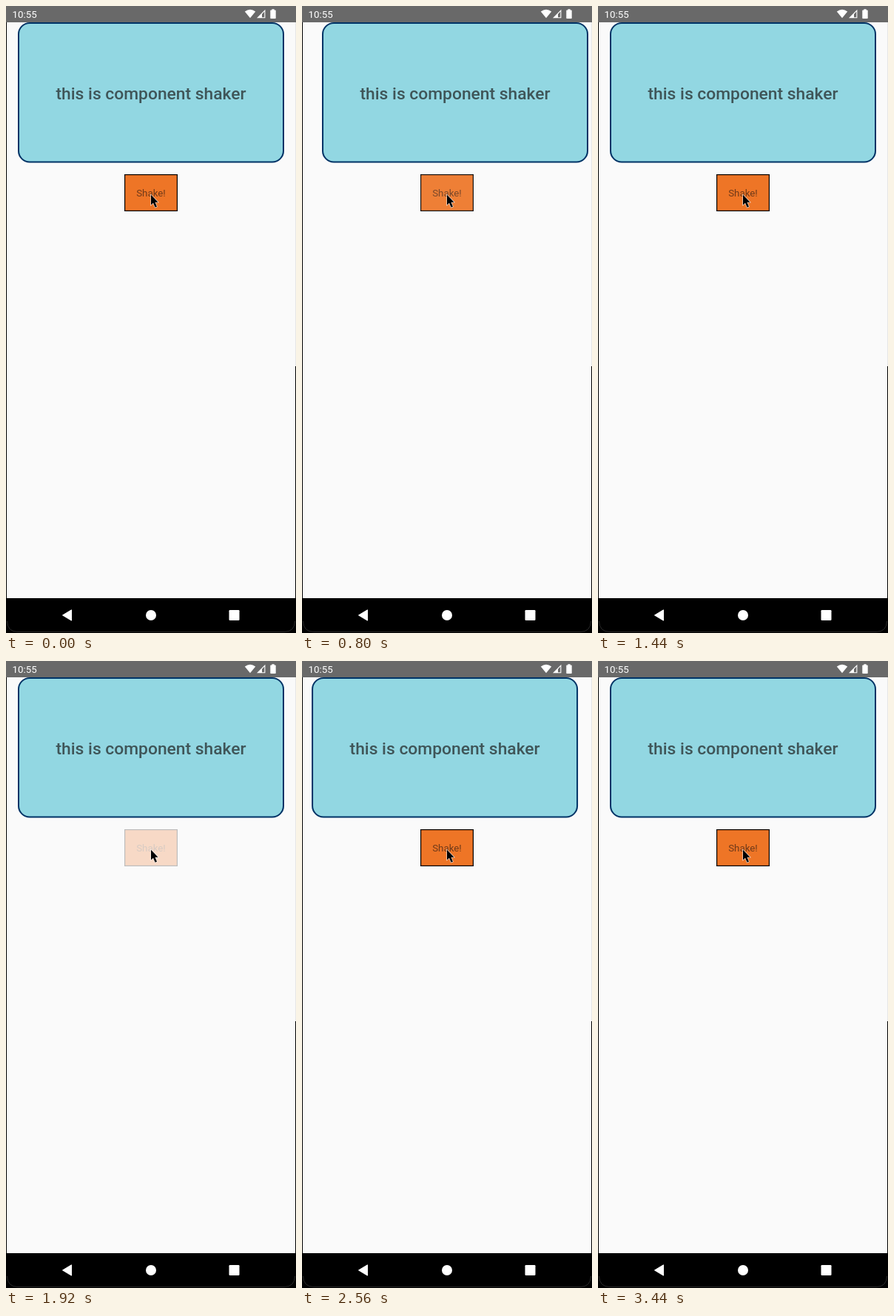
An HTML page that plays this animation: 392x846 px, repeating every 3.52 s.

```html
<!DOCTYPE html>
<html lang="en">
<head>
<meta charset="utf-8">
<title>Component shaker</title>
<style>
  html, body { margin: 0; width: 100%; height: 100%; overflow: hidden; background: #000; }
  svg { display: block; width: 392px; height: 846px; font-family: Roboto, sans-serif; }
</style>
</head>
<body>
<svg viewBox="0 0 392 846">
  <!-- screen -->
  <rect width="392" height="846"/>
  <rect x="1" y="22" width="390" height="777" fill="#fafafa"/>
  <rect x="391" y="22" width="1" height="464" fill="#e6e6e6"/>

  <g id="card">
    <rect x="17" y="23" width="358" height="187.5" rx="15" fill="#92d7e2" stroke="#003366" stroke-width="2"/>
    <text x="196" y="126" text-anchor="middle" font-size="22.8" font-weight="500" fill="#3f5558">this is component shaker</text>
  </g>

  <g id="button">
    <rect x="160.6" y="227.6" width="70.8" height="48.8" fill="#ee7526" stroke="#000" stroke-width="1.2"/>
    <text x="196" y="257" text-anchor="middle" font-size="13.3" fill="#6f3a1a">Shake!</text>
  </g>

  <!-- status bar -->
  <rect width="392" height="22" fill="#696969"/>
  <g fill="#fff">
    <text x="8.5" y="15.5" font-size="13.3">10:55</text>
    <path d="M322.8 7.4Q330 2.2 337.2 7.4L330 16.3Z"/>
    <path d="M339 16.3L350.4 4.8V16.3ZM346 15.2H349.3V7.6L346 10.9Z" fill-rule="evenodd"/>
    <path d="M357.3 6.2Q357.3 5.5 358 5.5H359.4V4.2H362.6V5.5H364Q364.7 5.5 364.7 6.2V16.3Q364.7 17 364 17H358Q357.3 17 357.3 16.3Z"/>
  </g>

  <!-- navigation bar -->
  <rect y="799" width="392" height="47"/>
  <path d="M1.5 830Q2 844.5 16 844.5H376Q390 844.5 390.5 830" fill="none" stroke="#292929"/>
  <g fill="#fff">
    <path d="M76.5 822L88.5 814.8V829.2Z" stroke="#fff" stroke-linejoin="round"/>
    <circle cx="196" cy="822" r="7"/>
    <rect x="301.5" y="815" width="14" height="14" rx="1.2"/>
  </g>

  <!-- pointer -->
  <path d="M196 254.8V268.4L199 265.7L201.6 271.7L204 270.7L201.5 264.8H205.6Z" stroke="#fff" stroke-width="1.1" paint-order="stroke"/>
</svg>
<script>
  const LOOP = 3520, STEP = 80, AMPLITUDE = 15, SWINGS = 2.5;
  const taps = [
    { press: 640, start: 696, period: 282 },
    { press: 1920, start: 2070, period: 320 }
  ];
  const card = document.getElementById('card');
  const button = document.getElementById('button');
  const clamp = v => Math.min(1, Math.max(0, v));
  const smooth = p => p * p * (3 - 2 * p);

  function shakeOffset(t, { start, period }) {
    const cycles = (t - start) / period;
    return cycles > 0 && cycles < SWINGS ? AMPLITUDE * Math.sin(2 * Math.PI * cycles) : 0;
  }

  function buttonOpacity(t, { press }) {
    return t < press ? 1 : 0.24 + 0.76 * smooth(clamp((t - press) / 200));
  }

  function render(t) {
    const x = taps.reduce((sum, tap) => sum + shakeOffset(t, tap), 0);
    card.setAttribute('transform', `translate(${x.toFixed(2)} 0)`);
    button.setAttribute('opacity', Math.min(...taps.map(tap => buttonOpacity(t, tap))));
  }

  const origin = performance.now();
  function tick() {
    const t = (performance.now() - origin) % LOOP;
    render(Math.floor(t / STEP) * STEP);
    requestAnimationFrame(tick);
  }
  tick();
</script>
</body>
</html>
```
